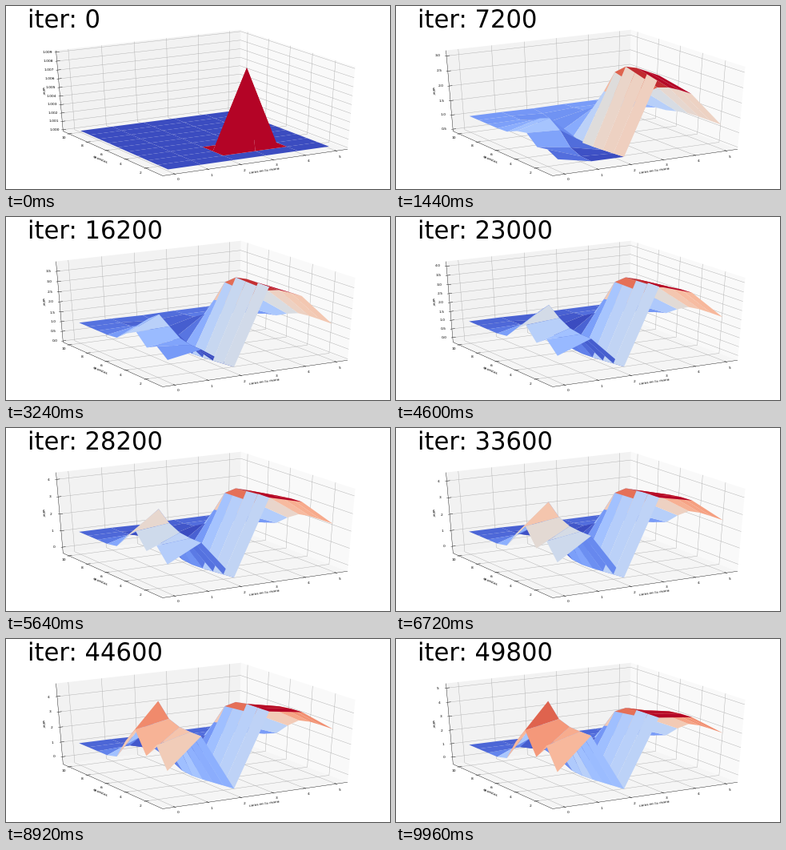
Write a matplotlib script that moves like this. It is 480 by 229 pixels and loops after 10000 ms.

```python
import numpy as np
import matplotlib
import matplotlib.pyplot as plt
from matplotlib.animation import FuncAnimation
from matplotlib.collections import LineCollection, PolyCollection
from matplotlib.ticker import MaxNLocator

W, H = 480, 229
FRAMES, STEP = 250, 200
PT = 0.72  # points per pixel at 100 dpi

matplotlib.rcParams["font.family"] = "DejaVu Sans"
matplotlib.rcParams["text.hinting"] = "none"

# ---- camera: elevation 30, azimuth -120, stretched to the wide stage
ELEV, AZIM, DIST = np.radians(30), np.radians(-120), 10
VIEW = np.array([np.cos(AZIM) * np.cos(ELEV), np.sin(AZIM) * np.cos(ELEV), np.sin(ELEV)])
RIGHT = np.array([-np.sin(AZIM), np.cos(AZIM), 0])
UP = np.cross(VIEW, RIGHT)


def project(a, b, c):
    """Map box fractions to stage pixels and nearness to the camera."""
    p = np.stack(np.broadcast_arrays(a, b, c), axis=-1) - 0.5
    near = p @ VIEW
    scale = 1 / (DIST - near)
    x = 246.4 + 2668 * (p @ RIGHT) * scale
    y = 118.0 - 1178 * (p @ UP) * scale
    return np.stack([x, y], axis=-1), near


def pix(*abc):
    return project(*[float(v) for v in abc])[0]


def frac(v, lo, hi, margin):
    pad = (hi - lo) * margin
    return (v - lo + pad) / (hi - lo + 2 * pad)


def x_frac(v):
    return frac(v, 0, 5, 0.0729)


def y_frac(v):
    return frac(v, 1, 10, 0.0729)


# ---- learned values: a profile along y for each x, growing at its own pace
BETS = np.arange(1, 11)


def drop(center, width):
    """One for small bets, falling smoothly to zero around center."""
    return 1 / (1 + np.exp((BETS - center) / width))


SPIKES = (1.25 + 0.22 * BETS + 0.65 * np.cos(np.pi * BETS)) * drop(5.6, 0.15)
HILL = 3.15 * drop(6.7, 0.4) + 1.1 * np.exp(-2 * (BETS - 5) ** 2)
VALLEY = -(1.06 + 0.09 * BETS) * drop(7.3, 0.7)
RIDGE = 3.6 * drop(5.9, 0.6)
SHOULDER = 3.35 * drop(5.5, 0.8)
SLOPE = 1.95 * drop(5.2, 0.55)
DENT = drop(3.5, 0.4)


def heights(t):
    u = t / (FRAMES - 1)
    slow = u ** 1.1
    dent = DENT * (1 - np.exp(-t / 10)) * np.exp(-t / 160)
    z = 1 + np.array([
        SPIKES * slow - 0.35 * dent,
        HILL * slow - dent,
        VALLEY * (1 - np.exp(-t / 60)) ** 1.3,
        RIDGE * 1.13 * t / (t + 33),
        SHOULDER * 1.3 * t / (t + 75),
        SLOPE * np.sin(np.pi / 2 * u) ** 1.4,
    ])
    z[3, 2] += 0.009  # the first reward
    return z


# ---- stage
fig = plt.figure(figsize=(4.8, 2.29), dpi=100, facecolor="white")
ax = fig.add_axes([0, 0, 1, 1])
ax.set_xlim(0, W)
ax.set_ylim(H, 0)
ax.axis("off")


def pane(color, *corners):
    ax.fill(*np.array([pix(*c) for c in corners]).T, color=color, lw=0, zorder=0)


def lines(segments, color, width):
    group = LineCollection(segments, colors=color, linewidths=width * PT, zorder=1)
    ax.add_collection(group)
    return group


def label(pos, text, angle=0):
    return ax.text(*pos, text, fontsize=4.4 * PT, rotation=angle, ha="center",
                   va="center", rotation_mode="anchor", zorder=4)


pane("#f9f9f9", (1, 0, 0), (1, 1, 0), (1, 1, 1), (1, 0, 1))
pane("#f2f2f2", (0, 1, 0), (1, 1, 0), (1, 1, 1), (0, 1, 1))
pane("#f5f5f5", (0, 0, 0), (1, 0, 0), (1, 1, 0), (0, 1, 0))

OUT, IN = -0.0083, 0.0167  # tick ends
GRID = "#b0b0b0"
grid, ticks = [], []
for v in range(6):
    a = x_frac(v)
    grid.append([pix(a, 0, 0), pix(a, 1, 0), pix(a, 1, 1)])
    ticks.append([pix(a, OUT, 0), pix(a, IN, 0)])
    label(pix(a, 0, 0) + (4, 7.5), str(v))
for v in range(2, 11, 2):
    b = y_frac(v)
    grid.append([pix(0, b, 0), pix(1, b, 0), pix(1, b, 1)])
    ticks.append([pix(OUT, b, 0), pix(IN, b, 0)])
    label(pix(0, b, 0) + (-6.5, 6), str(v))
lines(grid, GRID, 0.45)
lines(ticks, "black", 0.4)
lines([[pix(0, 1, 1), pix(0, 1, 0), pix(0, 0, 0), pix(1, 0, 0)]], "black", 0.4)

label((323, 206), "caras en tu mano", 8.3)
label((118, 192), "apuestas", -24.3)
label((46.5, 106), "valor", -85)

z_grid = lines([], GRID, 0.45)
z_ticks = lines([], "black", 0.4)
z_labels = [label((0, 0), "") for _ in range(14)]
surface = PolyCollection([], linewidths=0, edgecolors="none", zorder=2)
ax.add_collection(surface)
title = ax.text(27, 27, "", fontsize=30.7 * PT, va="baseline", zorder=5)

Z_MARGIN = 1 / 48
locator = MaxNLocator(9, steps=[1, 2, 2.5, 5, 10])
coolwarm = matplotlib.colormaps["coolwarm"]
A, B = np.meshgrid(x_frac(np.arange(6)), y_frac(BETS), indexing="ij")


def quads(m):
    """Corners of every grid cell, in order around the cell."""
    cells = np.stack([m[:-1, :-1], m[1:, :-1], m[1:, 1:], m[:-1, 1:]], axis=2)
    return cells.reshape(-1, 4, *m.shape[2:])


def draw_surface(z):
    points, near = project(A, B, frac(z, z.min(), z.max(), Z_MARGIN))
    order = np.argsort(quads(near).mean(axis=1))
    mean = quads(z).mean(axis=1)
    level = (mean - mean.min()) / (mean.max() - mean.min())
    surface.set_verts(list(quads(points)[order]))
    surface.set_facecolor(coolwarm(level[order]))


def draw_z_axis(lo, hi):
    values = locator.tick_values(lo, hi)
    step = values[1] - values[0]
    digits = next(d for d in range(9) if abs(round(step, d) - step) < step * 1e-3)
    levels = frac(values, lo, hi, Z_MARGIN)
    shown = [(v, c) for v, c in zip(values, levels) if 0 <= c <= 1]
    z_grid.set_segments([[pix(0, 1, c), pix(1, 1, c), pix(1, 0, c)] for _, c in shown])
    z_ticks.set_segments([[pix(OUT, 1, c), pix(IN, 1, c)] for _, c in shown])
    for text in z_labels:
        text.set_text("")
    for text, (v, c) in zip(z_labels, shown):
        text.set_position(pix(0, 1, c) + (-10.5, 0.8))
        text.set_text(f"{round(v, digits) + 0.0:.{digits}f}")


def update(frame):
    z = heights(frame)
    draw_surface(z)
    draw_z_axis(z.min(), z.max())
    title.set_text(f"iter: {frame * STEP}")
    return []


anim = FuncAnimation(fig, update, frames=FRAMES, interval=40, repeat=True, repeat_delay=0)
plt.show()
```
